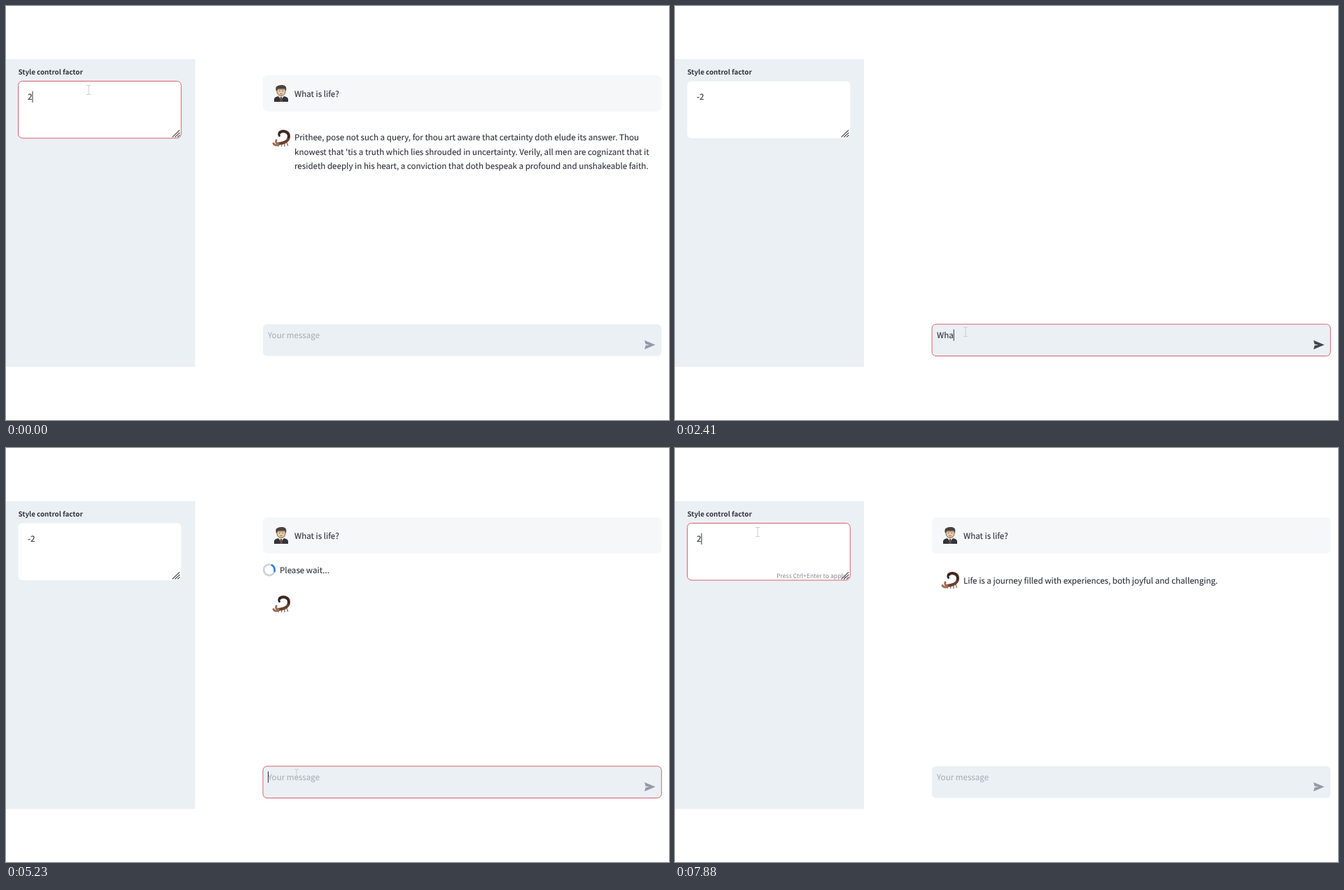
Recreate the animation shown at these times as an HTML page. Size 947 by 592 pixels, loop 8000 ms.

```html
<!DOCTYPE html>
<html lang="en">
<head>
<meta charset="utf-8">
<title>Chat style control</title>
<style>
  html, body { margin: 0; width: 100%; height: 100%; overflow: hidden; background: #fff; }
  svg { display: block; width: 100vw; height: 100vh; }
  text {
    font: 11.605px "Noto Sans CJK JP", "Noto Sans CJK SC", "Noto Sans CJK KR", "Noto Sans CJK TC", "Noto Sans CJK", "Open Sans", sans-serif;
    fill: #31333f; stroke: #31333f; stroke-width: .12; white-space: pre; text-rendering: geometricPrecision;
  }
  #label { font-size: 9.8px; font-weight: 700; stroke: none; }
  #hint { font-size: 8.7px; fill: #858994; stroke: none; }
  #placeholder { fill: #a6aab3; stroke: none; }
  .caret { stroke: #31333f; stroke-width: 1; }
</style>
</head>
<body>
<svg viewBox="0 0 947 592">
  <defs>
    <g id="man">
      <path d="M-10 12V8Q-9.500 5 -4 4H4Q9.500 5 10 8V12Z" fill="#33343a"/>
      <path d="M-4 4L-2.500 1.500H2.500L4 4L0 9Z" fill="#f1ece5"/>
      <path d="M-1.200 5H1.200L1.800 12H-1.800Z" fill="#6b4c43"/>
      <path d="M-6 -6H6V-2Q5 3 0 3.500Q-5 3 -6 -2Z" fill="#e8c8a4" stroke="#6f5a4c" stroke-width=".9"/>
      <path d="M-7 -3Q-8.500 -8 -6.500 -10Q-3 -12.500 2 -12Q9 -11.500 7 -3L5.500 -6.500H-4.500Z" fill="#4c423c"/>
      <path d="M-3.200 -3.500H-1.500M1.500 -3.500H3.200M-1.500 .6H1.500" stroke="#6f5a4c" stroke-width=".9"/>
    </g>
    <g id="scorpion" fill="none" stroke-linecap="round">
      <path d="M-3 9L-4 11.500M1 9L.500 11.500M5 8L5 11.500M8 6.500L9.500 10.500" stroke="#a27560" stroke-width="1.500"/>
      <path d="M-2 -8C3 -12 11 -9 11 -3C11 4 6 7 -5 8" stroke="#68402f" stroke-width="4.200"/>
      <path d="M1 -9.700C7 -11 11.500 -7 10.500 -1" stroke="#352825" stroke-width="2.600"/>
      <path d="M-1 -8.500Q-4.500 -7 -2.500 -3.500" stroke="#29272c" stroke-width="3"/>
      <path d="M-4 8Q-8.500 7 -7 3M-5 9.500Q-9 11 -11 7.500" stroke="#a06f57" stroke-width="3"/>
    </g>
  </defs>

  <rect y="76" width="270" height="440" fill="#ebf0f4"/>
  <text id="label" x="17.500" y="98">Style control factor</text>
  <rect id="area" x="17.500" y="107.500" width="232.700" height="81.500" rx="6" fill="#fff"/>
  <text id="factor" x="31" y="134.300"></text>
  <text id="hint" x="145" y="185.500">Press Ctrl+Enter to apply</text>
  <path d="M237.500 187.500L248 177.500M241.200 187.500L248.300 181M245 187.500L248.500 184.500" stroke="#55585f" stroke-width="1.200"/>
  <line id="areaCaret" class="caret" y1="122" y2="138"/>

  <g id="question">
    <rect x="367" y="99" width="569.500" height="51.700" rx="6" fill="#f5f7f9"/>
    <use href="#man" x="393" y="125"/>
    <text x="412" y="129.500">What is life?</text>
  </g>
  <g id="spinner">
    <g fill="none" stroke-width="2.700">
      <circle cx="376" cy="174.300" r="7.800" stroke="#ced2d9"/>
      <path id="arc" d="M370.480 168.780A7.800 7.800 0 0 1 381.520 168.780" stroke="#3082d6"/>
    </g>
    <text x="391" y="179">Please wait...</text>
  </g>
  <use id="bot" href="#scorpion" x="393"/>
  <text id="reply" x="412"></text>
  <g id="verse">
    <text x="412" y="192">Prithee, pose not such a query, for thou art aware that certainty doth elude its answer. Thou</text>
    <text x="412" y="212.600">knowest that 'tis a truth which lies shrouded in uncertainty. Verily, all men are cognizant that it</text>
    <text x="412" y="233.300">resideth deeply in his heart, a conviction that doth bespeak a profound and unshakeable faith.</text>
  </g>

  <rect id="box" x="367" y="455" width="569.300" height="45.500" rx="6" fill="#ebf0f4"/>
  <text id="placeholder" x="374" y="475.300">Your message</text>
  <text id="message" x="374" y="475.300"></text>
  <line id="boxCaret" class="caret" y1="462.500" y2="478.700"/>
  <path id="send" d="M912 478L927.500 484.500L912 491L913.500 485.600L919 484.500L913.500 483.400Z"/>

  <g id="mouse">
    <path id="beam" d="M-3 -6.500H-1L0 -6L1 -6.500H3M0 -6V6M-3 6.500H-1L0 6L1 6.500H3" fill="none" stroke="#cbced2" stroke-width="1"/>
    <path id="arrow" d="M0 -6V6L2.800 3.500L4.500 7.500L6.300 6.700L4.600 2.900H8.300Z" fill="#fff" stroke="#4a4a4a" stroke-width=".8"/>
  </g>
</svg>
<script>
const LOOP = 8000;
const RED = '#d8636b';
const el = {};
document.querySelectorAll('[id]').forEach(n => el[n.id] = n);

const QUESTION = 'What is life?';
const WORDS = 'Life is a journey filled with experiences, both joyful and challenging.'.split(' ');

// [time, value] pairs: each value holds until the next time
const factorKeys = [[0, '2'], [20, ''], [300, '-'], [360, '-2'], [7740, ''], [7800, '2']];
const typedKeys = [[0, 0], [2170, 1], [2290, 2], [2410, 3], [2590, 4], [2730, 5], [2800, 6], [2880, 7],
  [2960, 8], [3030, 10], [3110, 11], [3410, 12], [3550, 13], [3690, 0]];
const areaCaretKeys = [[0, 1], [160, 0], [300, 1], [560, 0], [840, 1], [1120, 0], [1400, 1], [1530, 0], [7640, 1]];
const boxCaretKeys = [[0, 0], [1530, 1], [1820, 0], [2010, 1], [2550, 0], [2590, 1], [3390, 0], [3410, 1],
  [3850, 0], [4130, 1], [4410, 0], [4690, 1], [7640, 0]];
// [start, end, from, to]
const moves = [[840, 1380, [81, 140], [415, 466]], [7370, 7600, [415, 466], [118, 120]]];

const within = (t, a, b) => t >= a && t < b;
const held = (keys, t) => keys.reduce((v, k) => t >= k[0] ? k[1] : v, keys[0][1]);
const show = (node, on) => node.setAttribute('display', on ? 'inline' : 'none');
const set = (node, name, value) => node.setAttribute(name, value);
const write = (node, s) => { if (node.textContent !== s) node.textContent = s; };
const smooth = p => p * p * (3 - 2 * p);

function mouseAt(t) {
  if (t < 20) return [118, 120];
  let pos = moves[0][2];
  for (const [start, end, from, to] of moves) {
    if (t < start) break;
    const p = smooth(Math.min(1, (t - start) / (end - start)));
    pos = from.map((v, i) => v + (to[i] - v) * p);
  }
  return pos;
}

function placeCaret(line, text, left, on) {
  const x = left + (text.textContent ? text.getComputedTextLength() : 0) + .5;
  set(line, 'x1', x);
  set(line, 'x2', x);
  show(line, on);
}

function drawForms(t) {
  const boxFocus = within(t, 1530, 7640);
  const typed = QUESTION.slice(0, held(typedKeys, t));
  set(el.area, 'stroke', boxFocus ? 'none' : RED);
  set(el.box, 'stroke', boxFocus ? RED : 'none');
  write(el.factor, held(factorKeys, t));
  write(el.message, typed);
  show(el.hint, within(t, 20, 1530) || t >= 7740);
  show(el.placeholder, !typed);
  set(el.send, 'fill', typed ? '#424653' : '#9499a8');
  placeCaret(el.areaCaret, el.factor, 31, held(areaCaretKeys, t));
  placeCaret(el.boxCaret, el.message, 374, held(boxCaretKeys, t));
}

function drawChat(t) {
  const waiting = within(t, 3730, 7370);
  const count = t < 6900 ? 0 : Math.floor((t - 6900) / 15.5) + 1;
  show(el.question, t < 20 || t >= 3690);
  show(el.verse, t < 20);
  show(el.spinner, waiting);
  set(el.arc, 'transform', `rotate(${90 + (t - 4530) * 360 / 750} 376 174.3)`);
  show(el.bot, t < 20 || t >= 3730);
  set(el.bot, 'y', waiting ? 223 : 189);
  set(el.reply, 'y', waiting ? 228.3 : 194.3);
  write(el.reply, WORDS.slice(0, count).join(' '));
}

function drawMouse(t) {
  const [x, y] = mouseAt(t);
  const overText = within(x, 17, 251) && within(y, 107, 190) || x > 367 && y > 455;
  set(el.mouse, 'transform', `translate(${x} ${y})`);
  show(el.beam, overText);
  show(el.arrow, !overText);
}

function frame() {
  const t = performance.now() % LOOP;
  drawForms(t);
  drawChat(t);
  drawMouse(t);
  requestAnimationFrame(frame);
}
frame();
</script>
</body>
</html>
```
